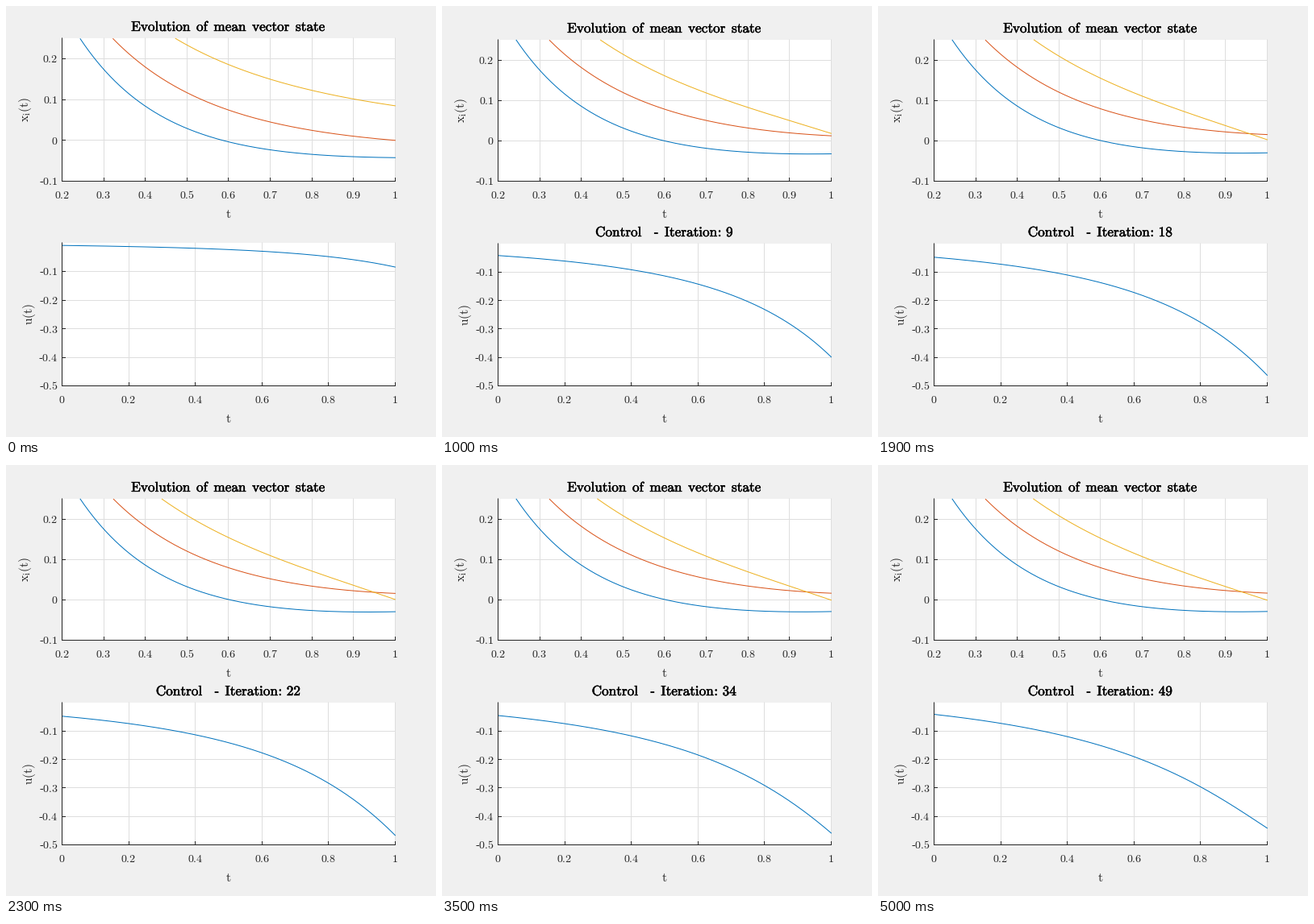
Recreate the animation shown at these times as a matplotlib script. Size 533 by 535 pixels, loop 5100 ms.

```python
import numpy as np
import matplotlib.pyplot as plt
from matplotlib.animation import FuncAnimation
from matplotlib.patches import Rectangle
from matplotlib.patheffects import withStroke

plt.rcParams["mathtext.fontset"] = "cm"

WIDTH, HEIGHT, DPI = 533, 535, 100
PX = 72 / DPI
LEFT, RIGHT = 69.5, 482.4
INK, GRID = "#262626", "#dedede"
BLUE, RED, YELLOW = (0, .447, .741), (.85, .325, .098), (.929, .694, .125)

ITERATIONS = 49
STEP, PENALTY = 1, 1e-3

# Averaged control of x' = -(nu I + N) x + (0, 0, 1) u, where N has ones above
# the diagonal, nu = 1, 1.5, ..., 6 and x(0) = (1, 1, 1).
t = np.linspace(0, 1, 801)
dt = t[1]
decay = np.exp(-np.outer(np.arange(1, 6.5, .5), t)).mean(axis=0)
KERNELS = [(t ** 2 / 2 - t) * decay, -t * decay, decay]
FREE = [(1 - 2 * t + t ** 2 / 2) * decay, (1 - t) * decay, decay]


def convolve(kernel, u):
    """Trapezoidal integral of kernel(t - s) u(s) over s in [0, t]."""
    ends = (kernel * u[0] + kernel[0] * u) / 2
    return (np.convolve(kernel, u)[:t.size] - ends) * dt


def descend():
    """Gradient descent on |mean x(1)|^2 + PENALTY |u|^2."""
    u, history = np.zeros_like(t), []
    for _ in range(ITERATIONS):
        states = [x + convolve(w, u) for x, w in zip(FREE, KERNELS)]
        adjoint = sum(x[-1] * w[::-1] for x, w in zip(states, KERNELS))
        u = u - STEP * (adjoint + PENALTY * u)
        history.append((states, u))
    return history


HISTORY = descend()

fig = plt.figure(figsize=(WIDTH / DPI, HEIGHT / DPI), dpi=DPI, facecolor="#f0f0f0")
ax = fig.add_axes([0, 0, 1, 1])


def label(x, y, text, size, color=INK, **kw):
    text = text.replace("-", "\u2010").replace(" ", r"\ \,")
    ax.text(x, y, rf"$\mathrm{{{text}}}$", fontsize=size * PX, color=color, **kw)


def title(y, text):
    bold = [withStroke(linewidth=.55 * PX, foreground="black")]
    label(275.9, y, text, 17.2, "black", ha="center", path_effects=bold)


def stroke(xs, ys, color, **kw):
    ax.plot(xs, ys, color=color, lw=PX, snap=False, **kw)


def panel(top, bottom, xlim, ylim, xticks, yticks, name, name_x, curves):
    def to_x(v):
        return LEFT + (v - xlim[0]) / (xlim[1] - xlim[0]) * (RIGHT - LEFT)

    def to_y(v):
        return bottom - (v - ylim[0]) / (ylim[1] - ylim[0]) * (bottom - top)

    ax.add_patch(Rectangle((LEFT, top), RIGHT - LEFT, bottom - top,
                           fc="white", lw=0))
    for v in xticks:
        x = np.floor(to_x(v)) + .5
        stroke([x, x], [top, bottom], GRID)
        stroke([x, x], [bottom - 4, bottom], INK, zorder=4)
        label(to_x(v), bottom + 21.5, f"{v:g}", 14, ha="center")
    for v in yticks:
        y = np.floor(to_y(v)) + .5
        stroke([LEFT, RIGHT], [y, y], GRID)
        stroke([LEFT, LEFT + 4], [y, y], INK, zorder=4)
        label(64.5, to_y(v) + 5, f"{v:g}", 14, ha="right")
    stroke([LEFT, LEFT, RIGHT], [top, bottom, bottom], INK, zorder=4)

    for values, color in curves:
        shown = (t >= xlim[0]) & (values <= ylim[1])
        stroke(to_x(t[shown]), to_y(values[shown]), color, zorder=3)

    label(276, bottom + 45.5, "t", 15.4, ha="center")
    label(name_x, (top + bottom) / 2, name, 15.4, rotation=90,
          rotation_mode="anchor", ha="center", va="baseline")


def draw(frame):
    titled = frame > 1
    k = max(frame - 1, 1)
    states, control = HISTORY[k - 1]
    ax.clear()
    ax.set(xlim=(0, WIDTH), ylim=(HEIGHT, 0))
    ax.axis("off")

    top1, top2 = (42, 295) if titled else (40, 294)
    panel(top1, 217.5, (.2, 1), (-.1, .25),
          np.arange(2, 11) / 10, np.arange(-1, 3) / 10, "x_i(t)", 28,
          zip(states, (BLUE, RED, YELLOW)))
    panel(top2, 471.5, (0, 1), (-.5, 0),
          np.arange(0, 6) / 5, np.arange(-5, 0) / 10, "u(t)", 33,
          [(control, BLUE)])

    title(top1 - 9, "Evolution of mean vector state")
    if titled:
        title(top2 - 9, rf"Control  - Iteration\!:\!\! {k}")


anim = FuncAnimation(fig, draw, frames=ITERATIONS + 2, init_func=lambda: None,
                     interval=100, repeat=True, repeat_delay=0)
plt.show()
```
